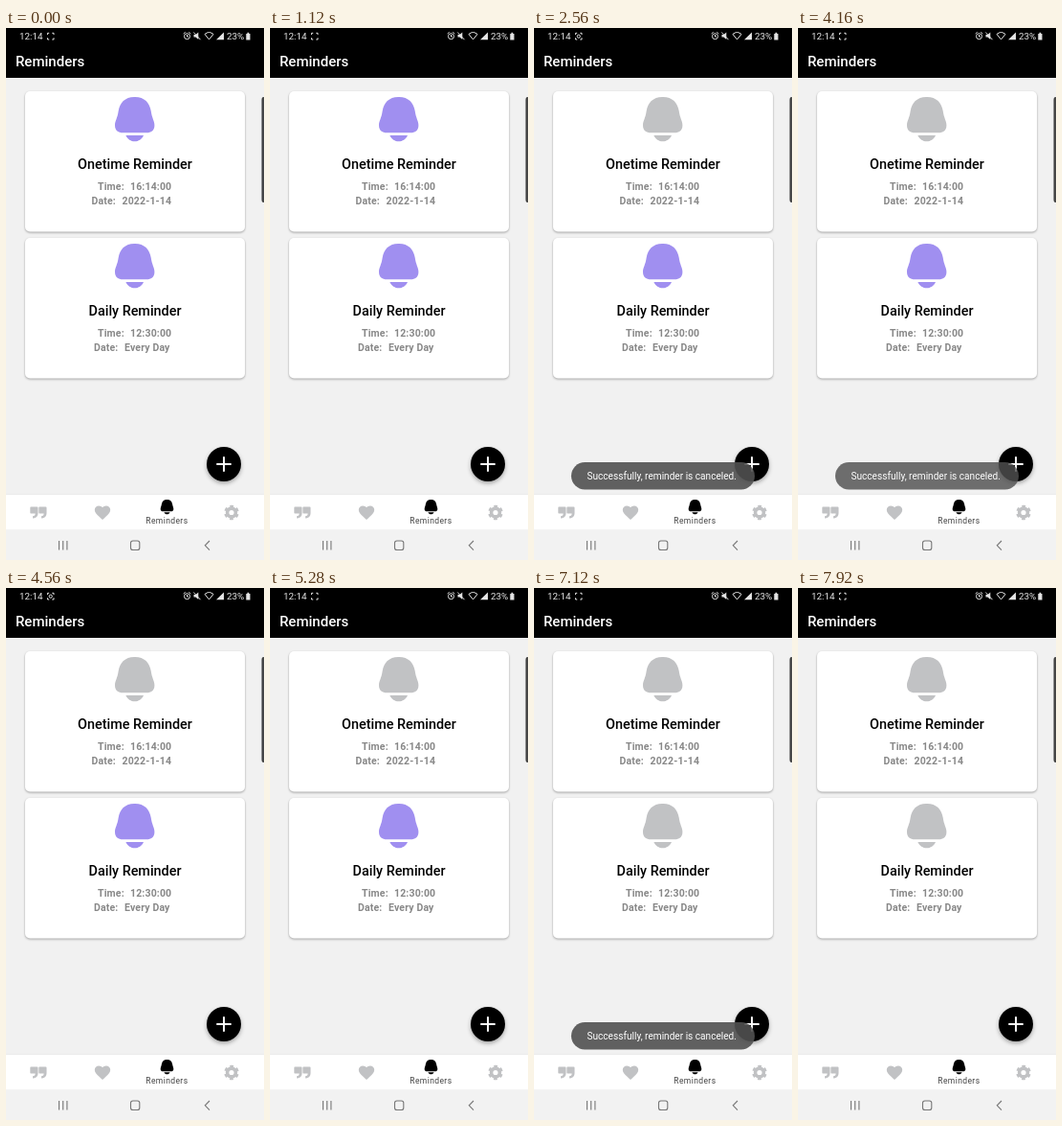
An HTML page that plays this animation: 270x555 px, repeating every 8 s.

```html
<!DOCTYPE html>
<html lang="en">
<head>
<meta charset="utf-8">
<title>Reminders</title>
<style>
  html, body { margin: 0; width: 100%; height: 100%; overflow: hidden; background: #f1f1f1; }
  svg { display: block; width: 270px; height: 555px; font-family: Roboto, sans-serif; }
  .card { fill: #fff; filter: drop-shadow(0 1px 1.3px #0005); }
  .fab { filter: drop-shadow(0 2px 2px #0005); }
  .name { font-size: 14.4px; font-weight: 500; text-anchor: middle; }
  .info { font-size: 10.5px; font-weight: 700; letter-spacing: .15px; fill: #888; }
  .line { fill: none; stroke: #777; stroke-width: 1.1; }
  .tab { fill: #c1c2c4; }
</style>
</head>
<body>
<svg viewBox="0 0 270 555">
  <defs>
    <path id="bell" d="M0 0C-10-.2-15.6 6-17 14.500C-18 22-20.700 25-20.700 29.500
      C-20.700 35-17 37.300-12.500 37.300H12.500C17 37.300 20.700 35 20.700 29.500
      C20.700 25 18 22 17 14.500C15.600 6 10-.2 0 0ZM-9.300 40H9.300C7.500 44 4 46.300 0 46.300S-7.500 44-9.300 40Z"/>
    <path id="quote" d="M0 0H6.500Q7.500 0 7.500 1V6.500C7.500 10 5.500 11.800 2 12V9.800C3.700 9.600 4.600 8.700 4.600 7H0Q-.7 7-.7 6V1Q-.7 0 0 0Z"/>
  </defs>
  <rect width="270" height="555" fill="#f1f1f1"/>
  <rect width="270" height="52" fill="#000"/>

  <!-- status bar -->
  <g fill="#e4e4e4" font-size="9.9">
    <text x="14" y="12.300">12:14</text>
    <text x="231" y="12.300">23%</text>
    <path d="M220 12.300L228 4.500V12.300ZM251.300 6h1.200v-1.200h1.800V6h1.200v6.500h-4.200Z"/>
    <path d="M208 6.500Q212.500 2.500 217 6.500L212.500 12Z" fill="none" stroke="#e4e4e4"/>
    <path d="M196.500 7h2l2.800-2.500v7.500l-2.800-2.500h-2Z"/>
    <g fill="none" stroke="#e4e4e4">
      <circle cx="189.500" cy="8.700" r="3"/>
      <path d="M189.500 7v2h1.500M185.700 6l2-1.700M193.300 6l-2-1.700M196.300 4.500l7.200 7.700"/>
      <path d="M43.500 7V5.300H45.200M48.300 5.300H50V7M50 10.300V12H48.300M45.200 12H43.500V10.300"/>
      <circle id="rec" cx="46.750" cy="8.650" r="1.600"/>
    </g>
  </g>
  <text x="10" y="40" font-size="15" font-weight="500" fill="#fff">Reminders</text>

  <!-- cards -->
  <rect class="card" x="20" y="66" width="230" height="146.500" rx="5"/>
  <use id="bell1" href="#bell" x="134.700" y="72"/>
  <text class="name" x="135" y="147">Onetime Reminder</text>
  <g class="info">
    <text x="96" y="169">Time:</text><text x="130" y="169">16:14:00</text>
    <text x="89.500" y="183.500">Date:</text><text x="121.500" y="183.500">2022-1-14</text>
  </g>
  <g transform="translate(0 153)">
    <rect class="card" x="20" y="66" width="230" height="146.500" rx="5"/>
    <use id="bell2" href="#bell" x="134.700" y="72"/>
    <text class="name" x="135" y="147">Daily Reminder</text>
    <g class="info">
      <text x="96" y="169">Time:</text><text x="130" y="169">12:30:00</text>
      <text x="92" y="183.500">Date:</text><text x="124" y="183.500">Every Day</text>
    </g>
  </g>
  <path d="M270 72h-.5q-2 0-2 3v104q0 3 2 3h.5Z" fill="#444"/>

  <circle class="fab" cx="228" cy="455" r="18"/>
  <path d="M220.300 455h15.400M228 447.300v15.400" stroke="#fff" stroke-width="2"/>

  <!-- tabs -->
  <rect y="486.500" width="270" height="37" fill="#fff"/>
  <path d="M0 486.500H270" stroke="#e2e2e2" stroke-width=".6"/>
  <g class="tab">
    <use href="#quote" x="26" y="499.500"/>
    <use href="#quote" x="35" y="499.500"/>
    <path d="M101 513L99.800 511.900C95.500 508 92.800 505.700 92.800 502.700C92.800 500.200 94.700 498.400 97.200 498.400
      C98.700 498.400 100.100 499.100 101 500.200C101.900 499.100 103.300 498.400 104.800 498.400
      C107.300 498.400 109.200 500.200 109.200 502.700C109.200 505.700 106.500 508 102.200 511.900Z"/>
  </g>
  <g fill="none" stroke="#c1c2c4">
    <circle cx="236" cy="505.500" r="4.400" stroke-width="3.600"/>
    <circle cx="236" cy="505.500" r="6.600" stroke-width="2.400" stroke-dasharray="3.600 3.311" stroke-dashoffset="-1.655"/>
  </g>
  <use href="#bell" transform="translate(168.500 492) scale(.33)"/>
  <text x="146.300" y="516.800" font-size="8.500" letter-spacing=".4" fill="#444">Reminders</text>

  <!-- system bar -->
  <rect y="523.500" width="270" height="31.500" fill="#f2f2f2"/>
  <path class="line" d="M55.500 535v9.500M59.700 535v9.500M63.900 535v9.500M213 535l-4.700 4.800l4.700 4.800"/>
  <rect class="line" x="130.500" y="535" width="9.300" height="9.500" rx="2.300"/>

  <g id="toast">
    <rect x="39" y="453" width="192" height="28.500" rx="14.250" fill="#505050" fill-opacity=".9"/>
    <text x="55.500" y="470.700" font-size="10.100" fill="#fff">Successfully, reminder is canceled.</text>
  </g>
</svg>
<script>
const $ = id => document.getElementById(id);
const LOOP = 8000, ON = '#a08ff0', OFF = '#c1c2c4';
const ramp = (t, from, span) => Math.min(1, Math.max(0, (t - from) / span));
const easeOut = p => 1 - (1 - p) ** 3;

// fades in at start, fades out at end
const toast = (t, start, end) => easeOut(ramp(t, start, 400)) * (1 - ramp(t, end, 440) ** 1.5);

function draw(now) {
  const t = now % LOOP, blink = t % 1000;
  $('rec').style.opacity = blink >= 300 && blink < 840 ? 1 : 0;
  $('bell1').style.fill = t < 2000 ? ON : OFF;
  $('bell2').style.fill = t < 5360 ? ON : OFF;
  $('toast').style.opacity = Math.max(toast(t, 2090, 4070), toast(t, 5440, 7430));
  requestAnimationFrame(draw);
}
draw(0);
</script>
</body>
</html>
```
